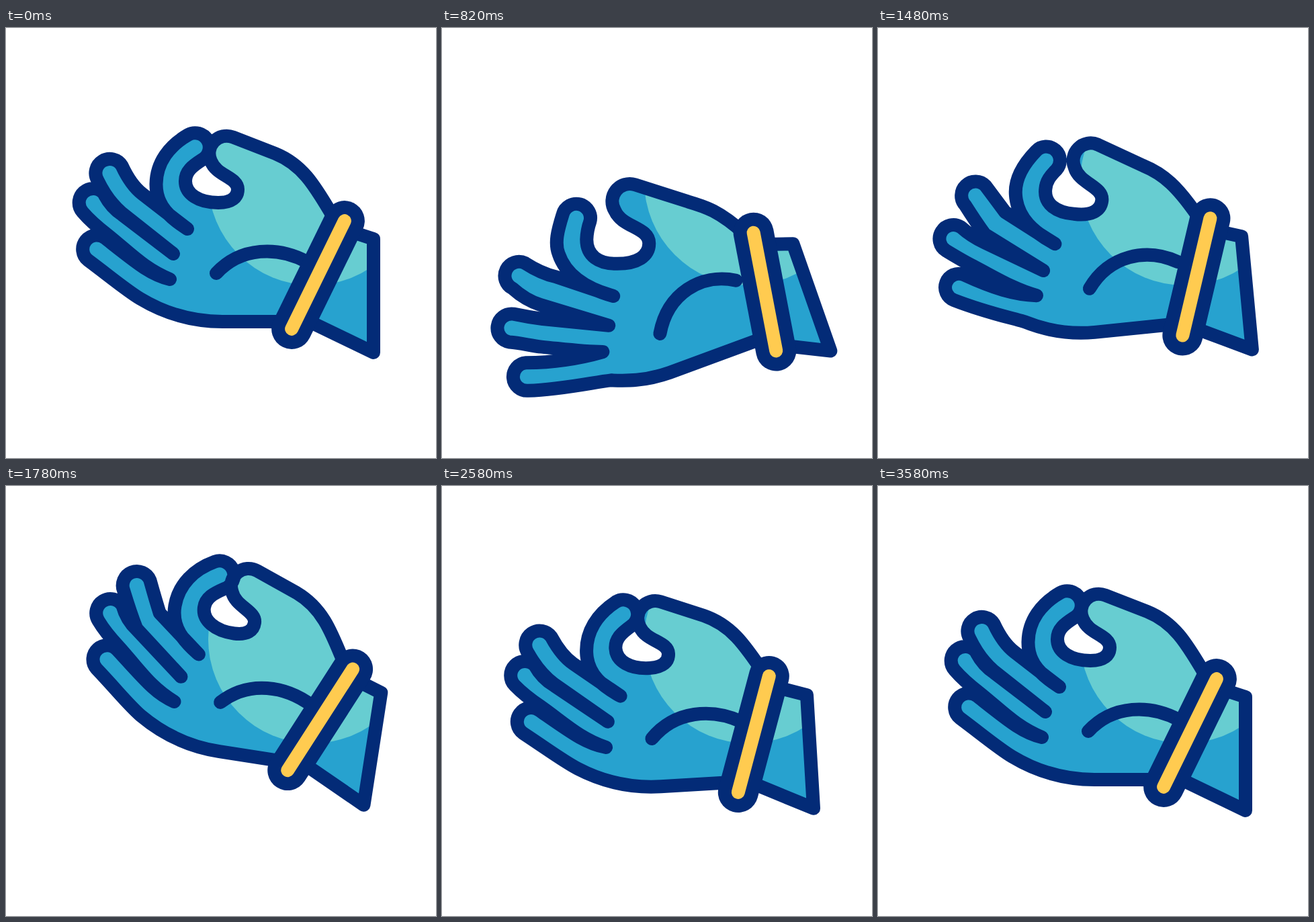
An HTML page for the animation above (3600 ms loop, 640x640 px).

```html
<!DOCTYPE html>
<html lang="en">
<head>
<meta charset="utf-8">
<title>Hand gesture</title>
<style>
  html, body { margin: 0; height: 100%; overflow: hidden; background: #fff; }
  svg { display: block; width: 100vw; height: 100vh; }
  .line { fill: none; stroke: #032b77; stroke-width: 20; stroke-linecap: round; stroke-linejoin: round; }
  .gold { stroke: #ffcb50; }
  .wide { stroke-width: 60; }
</style>
</head>
<body>
<svg viewBox="0 0 640 640">
  <clipPath id="inside"><path class="hand"/></clipPath>
  <path class="hand" fill="#27a2cf"/>
  <g clip-path="url(#inside)"><circle cx="456" cy="228" r="155" fill="#67cdd1"/></g>
  <path class="hand line"/>
  <path id="crease" class="line"/>
  <g id="bracelet">
    <path class="line wide" d="M0 -89.5V89.5"/>
    <path class="line gold" d="M0 -89.5V89.5"/>
  </g>
  <path id="streak" class="line gold" pathLength="1"
        d="M332 505C346 535 363 549 379 556S415 571 445 571"/>
</svg>
<script>
const LOOP = 3600;
const PIVOT = [547, 398.5];

// Each # is one point; arcs of radius 1 grow into half circles.
const TIP = 'A1 1 0 0 1 #', CURVE = 'C# # #';
const HAND = ['M# L# L# L#', CURVE, CURVE, TIP, CURVE, CURVE, CURVE, TIP, 'Q# # L# L# Q# #', TIP,
  'Q# # L#', CURVE, CURVE, TIP, CURVE, CURVE, CURVE, CURVE, 'A26 26 0 0 1 # L#', CURVE, 'L# L#Z'].join(' ');

const points = text => text.trim().split(/\s+/).map(p => p.split(',').map(Number));

const closed = points(`547,483 460,441 415,437 322,437
  275,437 235,424 200,403 180,391 160,374 122,345.5
  148,313 195,350 215,367 244,374 205,358 185,335 150,307 137,297 126,288 114,274
  145.5,246 155,266 173,278 249,336 172,275 151,257 136.5,227
  172.5,205 186,234 203,247 270,299 245,283 223,265 223.5,232 224,200 243,175 271,159
  292,196 278,205 267,213 267,228 267,247 287,260 316,260 336,260 345,252 345,240
  345,222 313,220 305,198 338,162.5 401,187 440,203 458,232 484,276 510,302 547,314`);

const open = points(`547,483 460,441 446,432 310,434
  270,434 245,424 225,416.5 200,411 150,406 102,391.5
  112,351 150,363 188,370 226,372 198,362 170,348 143,336 128,329 115,320 100,314
  119,276 138,287 158,297 248,338 161.5,275 143,261 131,239
  161,209.5 178,231 197,243 269,299 236,276 212,248 212.5,212 212,195 222,180 237,159
  272,182.5 267,189 263,196 259,205.5 250.5,229 264,246 287.5,254.5 318,266 338.5,260.5 345,243
  354,219.5 315,207 313.5,179 355,153 421.5,204 442,219 460,232 484,276 510,302 547,314`);

const creaseClosed = points('313,365 350,325 405,325 448,348');
const creaseOpen = points('316,375 346,322 403,309 449,337');

// [time, value] keys, joined by a smooth curve that never overshoots them.
const track = {
  turn: [[0, 0], [500, 15.8], [1100, 20.6], [1160, 20.4], [1480, 5.4], [1640, -3.5],
         [1860, -10], [2120, -3.4], [2580, 3.4], [2640, 3.5], [3240, 0], [LOOP, 0]],
  x: [[0, 547], [500, 550], [1100, 550.5], [1480, 549], [1860, 545], [2120, 546], [2580, 548], [3240, 547], [LOOP, 547]],
  y: [[0, 398.5], [500, 401], [1160, 400.5], [1480, 394.5], [1860, 391], [2120, 394.5], [2580, 395.5], [3240, 398.5], [LOOP, 398.5]],
  spread: [[0, 0], [500, .85], [1100, 1], [1160, 1], [1480, .5], [1800, -.05], [2120, 0], [LOOP, 0]],
  flick: [[0, 0], [1160, 0], [1480, .9], [1640, 1], [2120, .6], [2580, 0], [LOOP, 0]],
  swing: [[0, 26.1], [500, 13.9], [1160, 5.6], [1480, 18.6], [1800, 24], [2120, 21.3],
          [2580, 18.3], [3200, 28.6], [3500, 26.1], [LOOP, 26.1]]
};

const slope = (k, i) => (k[i + 1][1] - k[i][1]) / (k[i + 1][0] - k[i][0]);

function tangent(k, i) {
  if (i === 0 || i === k.length - 1) return 0;
  const a = slope(k, i - 1), b = slope(k, i);
  return a * b > 0 ? 2 * a * b / (a + b) : 0;
}

function sample(k, t) {
  let i = 0;
  while (i < k.length - 2 && t >= k[i + 1][0]) i++;
  const [t0, v0] = k[i], [t1, v1] = k[i + 1];
  const d = t1 - t0, u = (t - t0) / d, w = 1 - u;
  return v0 * w * w * (1 + 2 * u) + v1 * u * u * (3 - 2 * u)
    + d * u * w * (w * tangent(k, i) - u * tangent(k, i + 1));
}

const clamp = v => Math.min(1, Math.max(0, v));
const blend = (a, b, m) => a.map((p, i) => p.map((v, j) => v + (b[i][j] - v) * m));
const build = (shape, pts) => {
  let i = 0;
  return shape.replace(/#/g, () => pts[i++].map(v => v.toFixed(2)).join(' '));
};

const hands = document.querySelectorAll('.hand');
const [crease, bracelet, streak] = ['crease', 'bracelet', 'streak'].map(id => document.getElementById(id));

function draw(t) {
  const s = {};
  for (const name in track) s[name] = sample(track[name], t);

  const pts = blend(closed, open, s.spread);
  for (let i = 25; i <= 28; i++) {      // middle fingertip
    pts[i][0] += 9 * s.flick;
    pts[i][1] -= 4 * s.flick;
  }
  const pose = `translate(${s.x} ${s.y}) rotate(${-s.turn}) translate(${-PIVOT[0]} ${-PIVOT[1]})`;
  const d = build(HAND, pts);
  for (const el of hands) {
    el.setAttribute('d', d);
    el.setAttribute('transform', pose);
  }
  crease.setAttribute('d', build('M# ' + CURVE, blend(creaseClosed, creaseOpen, s.spread)));
  crease.setAttribute('transform', pose);
  bracelet.setAttribute('transform', `${pose} translate(${464.5 + 20 * s.spread} 367.5) rotate(${s.swing})`);

  const head = clamp((t - 390) / 220), tail = clamp((t - 500) / 220);
  streak.style.display = head > tail ? '' : 'none';
  streak.setAttribute('stroke-dasharray', `${head - tail} 2`);
  streak.setAttribute('stroke-dashoffset', -tail);
}

const start = performance.now();
function frame() {
  draw((performance.now() - start) % LOOP);
  requestAnimationFrame(frame);
}
frame();
</script>
</body>
</html>
```
